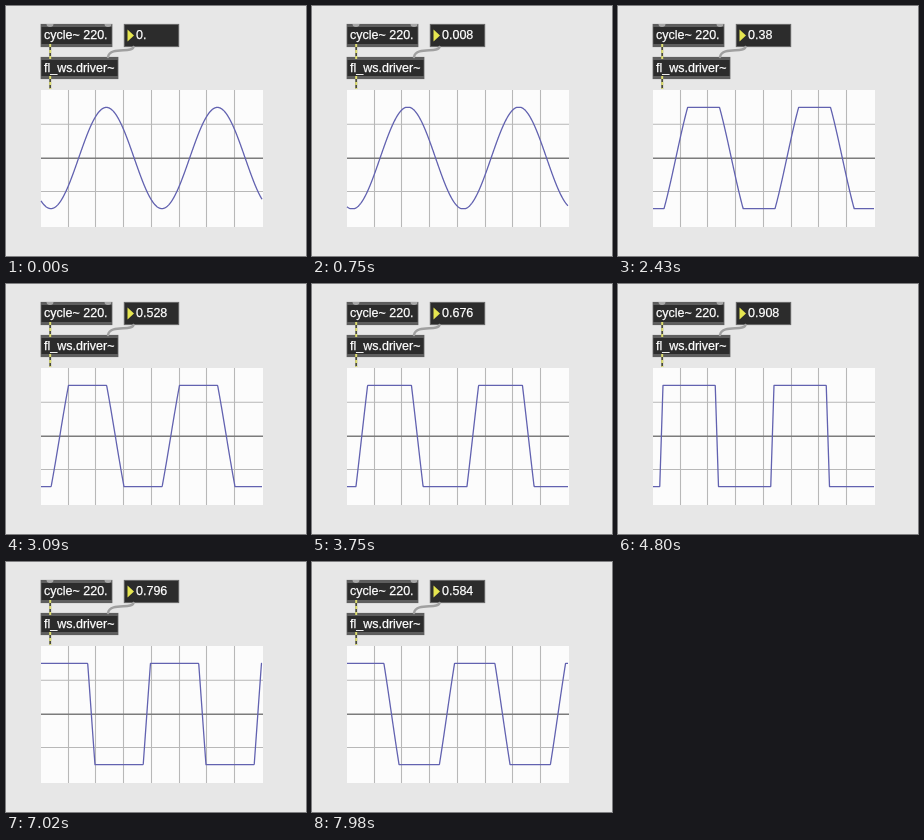
These frames come from a looping animation (300x250 px, 8 s). An HTML page:

```html
<!DOCTYPE html>
<html lang="en">
<head>
<meta charset="utf-8">
<title>Waveshaper driver</title>
<style>
  html, body { margin: 0; width: 100%; height: 100%; overflow: hidden; background: #e7e7e7; }
  svg { display: block; width: 300px; height: 250px; }
  text {
    font: 12.5px "Liberation Sans", Arial, sans-serif; white-space: pre;
    fill: #fff; stroke: #fff; stroke-width: .25;
  }
  .body { fill: #2c2c2c; stroke: #686868; stroke-width: .8; }
  .edge { fill: #5e5e5e; }
  .port { fill: #a8a8a8; }
  .grid { stroke: #b8b8b8; stroke-width: 1.1; fill: none; }
  .axis { stroke: #7c7c7c; stroke-width: 1.5; }
  .cord { fill: none; }
  #wave { fill: none; stroke: #6262b0; stroke-width: 1.3; stroke-linejoin: round; }
</style>
</head>
<body>
<svg viewBox="0 0 300 250">
  <rect width="300" height="250" fill="#e7e7e7"/>

  <rect class="body" x="35" y="18.3" width="71" height="22.4"/>
  <path class="edge" d="M35 18h71v3h-71zM35 38h71v3h-71z"/>
  <path class="port" d="M40.5 18a3.5 3 0 0 0 7 0zM98.5 18a3.5 3 0 0 0 7 0z"/>
  <text x="38" y="33.4">cycle~ 220.</text>

  <rect class="body" x="118.2" y="18.3" width="54.6" height="22.4"/>
  <path fill="#e6e650" d="M121.5 23.5L128 29.5L121.5 35.5Z"/>
  <text id="value" x="130" y="33.4">0.</text>

  <rect class="body" x="35" y="51.3" width="77" height="21.4"/>
  <path class="edge" d="M35 51h77v3h-77zM35 70h77v3h-77z"/>
  <text x="38" y="66">fl_ws.driver~</text>

  <rect x="35" y="84" width="222" height="137" fill="#fcfcfc"/>
  <path class="grid" id="grid"/>
  <path class="axis" d="M35 152.2H257"/>
  <path id="wave"/>

  <path class="cord" stroke="#a0a0a0" stroke-width="2.4" stroke-linecap="round" d="M127.5 41C126 47.5 104 40 102 51"/>
  <g class="cord">
    <path stroke="#4a4a38" stroke-width="1.8" d="M44.2 39V52M44.2 71V83"/>
    <path stroke="#dede70" stroke-width="2" stroke-dasharray="3 3" d="M44.2 38V53M44.2 70V83"/>
  </g>
</svg>
<script>
const LOOP = 8000, STEP = 30, RAMP = 4500;
const LEFT = 35, RIGHT = 256, MID = 152, AMP = 50.6, PERIOD = 111;
const wave = document.getElementById('wave');
const label = document.getElementById('value');

let grid = 'M35 118.2H257M35 185.5H257';
for (let i = 1; i < 8; i++) grid += `M${Math.round(LEFT + i * 27.71) - .5} 84V221`;
document.getElementById('grid').setAttribute('d', grid);

const clamp = (v, lo, hi) => Math.min(hi, Math.max(lo, v));

// The drive ramps up, holds at full, then starts back down, in 1/250 steps.
function driveAt(t) {
  const v = Math.min((t - 714) / RAMP, 1 - (t - 6108) / RAMP);
  return Math.round(clamp(v, 0, 1) * 250) / 250;
}

function format(v) {
  return Number.isInteger(v) ? v + '.' : String(+v.toFixed(3));
}

// Overdriven sine, hard clipped, drifting slowly to the left.
function wavePath(t, drive) {
  const peak = 100.4 - .0061 * t;
  const gain = 1 / Math.max(1 - drive, 1e-5);
  const points = [];
  for (let x = LEFT; x <= RIGHT; x += .25) {
    const s = Math.cos((x - peak) / PERIOD * 2 * Math.PI);
    points.push(x + ' ' + (MID - AMP * clamp(s * gain, -1, 1)).toFixed(2));
  }
  return 'M' + points.join('L');
}

function draw(now) {
  const t = Math.floor(now % LOOP / STEP) * STEP;
  const drive = driveAt(t);
  label.textContent = format(drive);
  wave.setAttribute('d', wavePath(t, drive));
}

let start;
function frame(now) {
  start ??= now;
  draw(now - start);
  requestAnimationFrame(frame);
}
draw(0);
requestAnimationFrame(frame);
</script>
</body>
</html>
```
